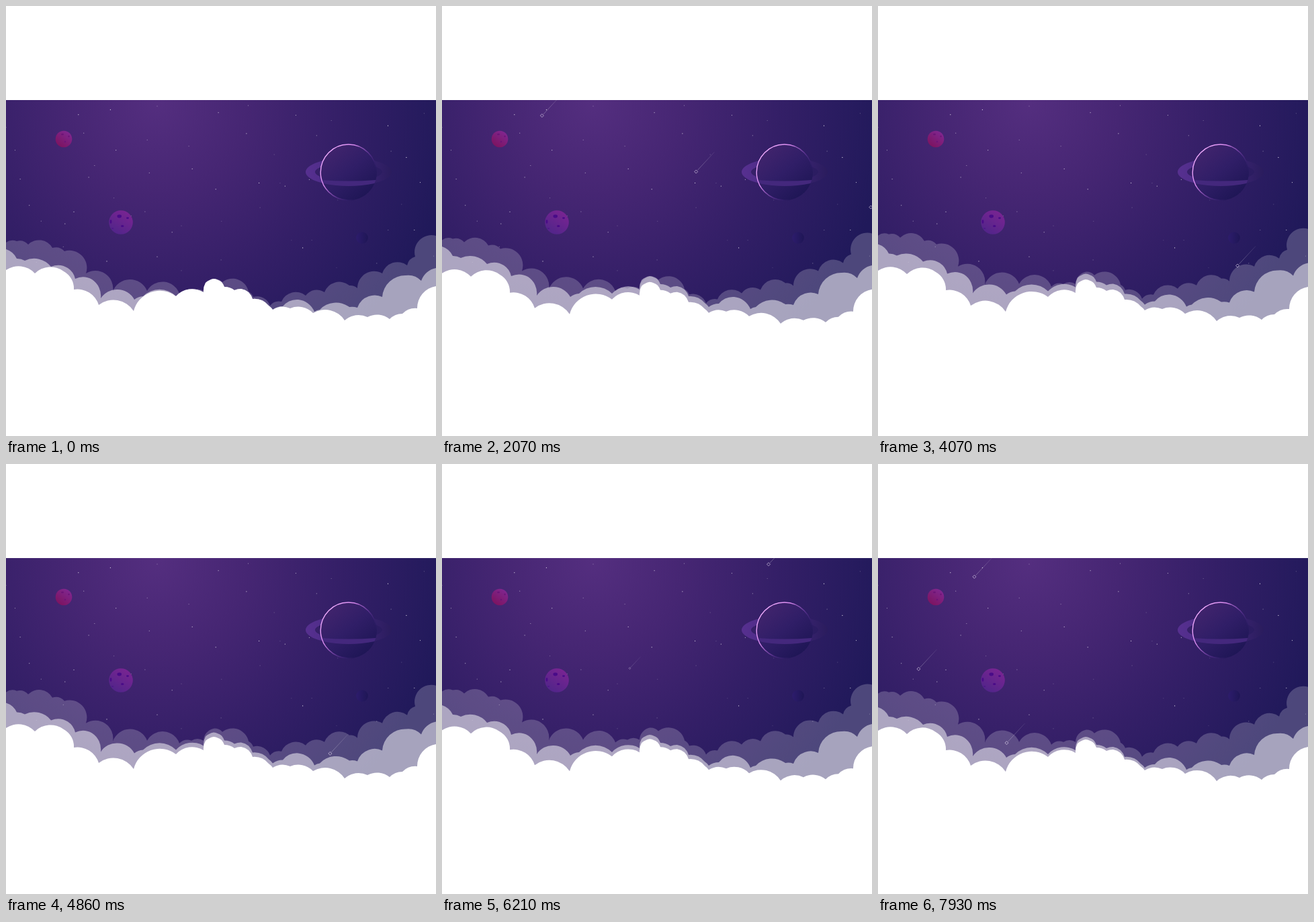
Recreate the animation shown at these times as an HTML page. Size 640 by 640 pixels, loop 8000 ms.

```html
<!DOCTYPE html>
<html lang="en">
<head>
<meta charset="utf-8">
<title>Night sky above the clouds</title>
<style>
  html, body { margin: 0; width: 100%; height: 100%; overflow: hidden; background: #fff; }
  svg { display: block; width: 100vw; height: 100vh; }
</style>
</head>
<body>
<svg viewBox="0 0 640 640">
  <defs>
    <radialGradient id="sky" gradientUnits="userSpaceOnUse" cx="225" cy="145" r="445">
      <stop offset="0" stop-color="#542e7f"/>
      <stop offset=".3" stop-color="#462673"/>
      <stop offset=".62" stop-color="#341f67"/>
      <stop offset="1" stop-color="#20195a"/>
    </radialGradient>
    <linearGradient id="body" x1=".15" y1=".1" x2=".8" y2=".9">
      <stop offset="0" stop-color="#41246d"/>
      <stop offset=".5" stop-color="#301e67"/>
      <stop offset="1" stop-color="#1f1656"/>
    </linearGradient>
    <linearGradient id="rim" x1=".05" y1=".2" x2=".8" y2=".75">
      <stop offset="0" stop-color="#f3b0ff"/>
      <stop offset=".35" stop-color="#d98af0"/>
      <stop offset=".75" stop-color="#7a3fb0" stop-opacity=".35"/>
      <stop offset="1" stop-color="#4a2c86" stop-opacity="0"/>
    </linearGradient>
    <linearGradient id="ring">
      <stop offset="0" stop-color="#573090"/>
      <stop offset=".45" stop-color="#482a82"/>
      <stop offset="1" stop-color="#2a1c5d"/>
    </linearGradient>
    <linearGradient id="red" x1=".8" y1=".1" x2=".2" y2=".9">
      <stop offset="0" stop-color="#80268f"/>
      <stop offset="1" stop-color="#7d1461"/>
    </linearGradient>
    <linearGradient id="violet" x1=".8" y1=".1" x2=".3" y2=".9">
      <stop offset="0" stop-color="#782492"/>
      <stop offset="1" stop-color="#54258a"/>
    </linearGradient>
    <linearGradient id="dark">
      <stop offset="0" stop-color="#2d1c6c"/>
      <stop offset="1" stop-color="#1f1656"/>
    </linearGradient>
    <linearGradient id="tail" gradientUnits="userSpaceOnUse" x1="2" y1="-2" x2="27" y2="-29">
      <stop offset="0" stop-color="#fff" stop-opacity=".34"/>
      <stop offset="1" stop-color="#fff" stop-opacity=".1"/>
    </linearGradient>
    <clipPath id="band"><rect y="140" width="640" height="345"/></clipPath>
    <g id="meteor" fill="none" stroke-width=".8">
      <path d="M2-2 27-29" stroke="url(#tail)"/>
      <path d="M0-2.5 2.5 0 0 2.5-2.5 0Z" stroke="#d8cce4" stroke-opacity=".85"/>
    </g>
  </defs>

  <g clip-path="url(#band)">
    <rect y="140" width="640" height="345" fill="url(#sky)"/>
    <g id="stars" fill="#fff"></g>

    <circle cx="86" cy="198" r="12.3" fill="url(#red)"/>
    <g fill="#6d1478">
      <ellipse cx="84" cy="191" rx="2" ry="1.3"/>
      <circle cx="93.5" cy="194" r="1.2"/>
      <circle cx="88" cy="202" r="1.2"/>
    </g>

    <circle cx="171" cy="322" r="17.8" fill="url(#violet)"/>
    <g fill="#490b88">
      <ellipse cx="168.7" cy="313" rx="3.3" ry="2.4"/>
      <ellipse cx="181" cy="315.6" rx="2" ry="1.4"/>
      <ellipse cx="156" cy="321" rx="1.4" ry="2.9"/>
      <ellipse cx="173.2" cy="327.6" rx="2.2" ry="1.5"/>
      <ellipse cx="158.5" cy="331" rx="1.7" ry="1" opacity=".5"/>
    </g>

    <path d="M446 247a64 21 0 0 1 128 0a64 21 0 0 1-128 0ZM460 247a50 13 0 0 0 100 0a50 13 0 0 0-100 0Z" fill="url(#ring)"/>
    <circle cx="510" cy="247.5" r="42" fill="url(#body)"/>
    <path d="M469.500 259Q510 262 550.500 259L548.500 264Q510 272 471.500 264Z" fill="#44287d"/>
    <circle cx="509.700" cy="247.500" r="41.500" fill="none" stroke="url(#rim)" stroke-width="1.400"/>
    <circle cx="530" cy="345" r="8.800" fill="url(#dark)"/>

    <g id="meteors"></g>
    <path id="back" fill="#fff" fill-opacity=".2"/>
    <path id="mid" fill="#fff" fill-opacity=".5"/>
  </g>
  <path id="front" fill="#fff"/>
</svg>
<script>
const LOOP = 8000;
const byId = id => document.getElementById(id);

function add(parent, tag, attrs) {
  const el = document.createElementNS('http://www.w3.org/2000/svg', tag);
  for (const name in attrs) el.setAttribute(name, attrs[name]);
  byId(parent).append(el);
  return el;
}

// Stars scattered by a seeded generator, one per cell of a loose grid.
let seed = 7;
const random = () => (seed = seed * 16807 % 2147483647) / 2147483647;
for (let x = 0; x < 640; x += 64) {
  for (let y = 142; y < 390; y += 42) {
    add('stars', 'circle', {
      cx: (x + 64 * random()).toFixed(1),
      cy: (y + 42 * random()).toFixed(1),
      r: 0.6,
      opacity: (0.15 + 0.7 * random()).toFixed(2)
    });
  }
}

// Joins points with upward puffs; wider puffs get a larger radius.
function puffs(outline, softness) {
  const [first, ...rest] = outline.split(' ').map(p => p.split(',').map(Number));
  let [px, py] = first;
  let d = `M${px} ${py}`;
  for (const [x, y] of rest) {
    const r = softness + 0.3 * Math.hypot(x - px, y - py);
    d += `A${r} ${r} 0 0 1 ${x} ${y}`;
    [px, py] = [x, y];
  }
  return d + 'V700H0Z';
}

const middle = '253,432 294,426 297,412 309,406 321,411 325,418 340,423 350,421 361,426 367,436 391,446 397,452';
const outlines = {
  front: `0,393 43,398 86,395 101,422 138,445 190,454 ${middle} ` +
    '423,450 457,457 504,468 538,463 571,466 590,458 612,450 640,417',
  mid: `0,362 16,376 28,379 67,388 92,390 103,406 128,407 141,435 166,422 191,437 204,432 ${middle} ` +
    '412,447 435,437 459,455 467,452 511,448 523,449 540,432 560,433 595,401 618,409 640,390',
  back: '0,352 16,350 33,355 69,360 87,365 119,398 159,425 210,424 258,428 276,424 294,424 309,406 322,411 ' +
    '361,425 368,433 393,446 410,440 446,431 474,426 511,416 523,420 560,398 597,386 609,373 640,342'
};

const sineInOut = p => (1 - Math.cos(Math.PI * p)) / 2;

// Vertical bobbing: travel in px, time of one full swing in ms.
const clouds = [
  { name: 'front', travel: 5, period: 4800, softness: 20 },
  { name: 'mid', travel: -7.4, period: 8000, softness: 20 },
  { name: 'back', travel: -13.5, period: 12000, softness: 12 }
];
for (const c of clouds) {
  c.el = byId(c.name);
  c.el.setAttribute('d', puffs(outlines[c.name], c.softness));
}

const flight = { dx: -554, dy: 500, time: 4800, delay: 0, scale: 1 };
const meteors = [
  { x: 255, y: 72, dx: -375, dy: 322, time: 5800 },
  { x: 596, y: 50 },
  { x: 678, y: 266, dy: 467, time: 12000 },
  { x: 561, y: 50, time: 4000, delay: 4190, scale: 0.6 },
  { x: 343, y: 50, delay: 5500 }
].map(m => ({ ...flight, ...m, el: add('meteors', 'use', { href: '#meteor' }) }));

function draw(t) {
  for (const c of clouds) {
    const y = c.travel * sineInOut(2 * t / c.period);
    c.el.setAttribute('transform', `translate(0 ${y.toFixed(2)})`);
  }
  for (const m of meteors) {
    const p = sineInOut(Math.max(0, t - m.delay) % m.time / m.time);
    const x = m.x + m.dx * p, y = m.y + m.dy * p;
    m.el.setAttribute('transform', `translate(${x.toFixed(2)} ${y.toFixed(2)}) scale(${m.scale})`);
  }
}

function tick() {
  draw(performance.now() % LOOP);
  requestAnimationFrame(tick);
}
tick();
</script>
</body>
</html>
```
